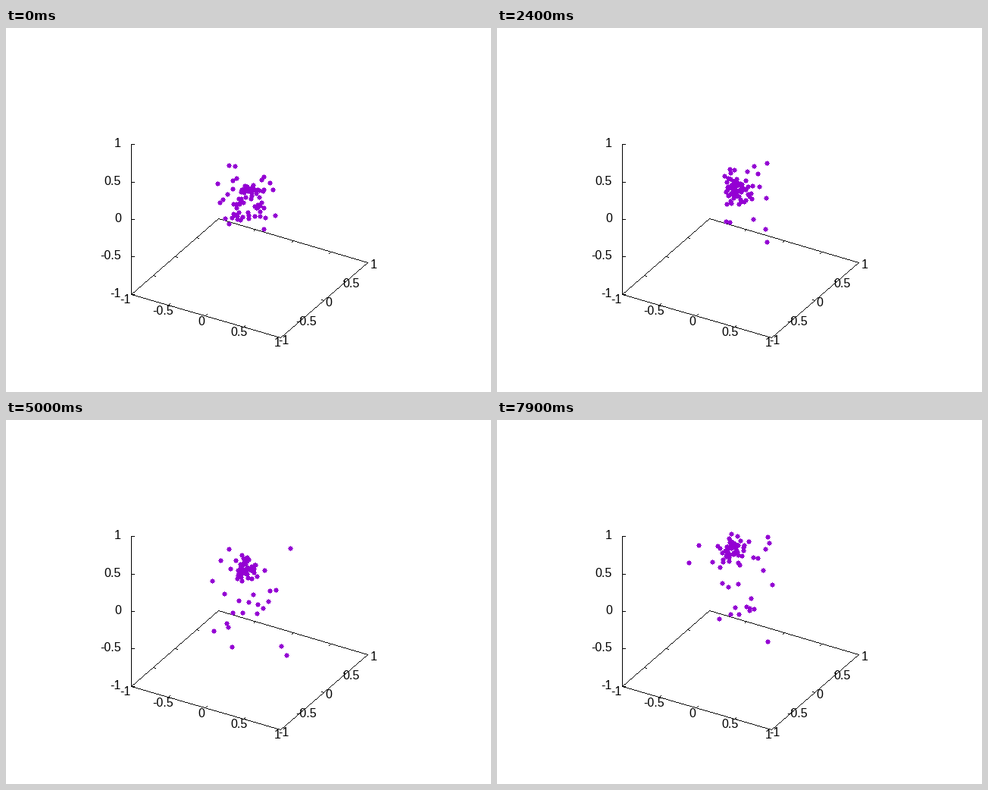
These frames come from a looping animation (640x480 px, 8000 ms). A matplotlib script:

```python
import numpy as np
import matplotlib.pyplot as plt
from matplotlib.animation import FuncAnimation
from matplotlib.path import Path

W, H, DPI = 640, 480, 100
FRAMES, STEP = 80, 100
PX = 72 / DPI
PURPLE = "#9400d3"

plt.rcParams["font.family"] = "Liberation Sans"
fig = plt.figure(figsize=(W / DPI, H / DPI), dpi=DPI, facecolor="white")
ax = fig.add_axes([0, 0, 1, 1])
ax.set_xlim(0, W)
ax.set_ylim(H, 0)
ax.axis("off")


def line(p, q):
    """Pixels of a crisp one-pixel line."""
    p, q = np.asarray(p), np.asarray(q)
    n = int(np.abs(q - p).max()) + 1
    return np.rint(np.linspace(p, q, n))


def label(text, x, y, ha="center"):
    ax.text(x, y + 5.4, text, ha=ha, va="baseline", fontsize=16 * PX, zorder=2)


def stamp(marker, size, color, zorder):
    art = ax.scatter([], [], s=(size * PX) ** 2, marker=marker, color=color,
                     linewidths=0, zorder=zorder)
    art.set_snap(False)
    return art


def place(art, pixels):
    art.set_offsets(np.rint(pixels) + 0.5)


# Box base and vertical axis
left, front = np.array([164, 350]), np.array([361, 407])
right, back = np.array([476, 308]), np.array([279, 250])
top = np.array([164, 152])
edges = [line(left, front), line(front, right), line(right, back),
         line(back, left), line(left, top)]

for k, name in enumerate(["-1", "-0.5", "0", "0.5", "1"]):
    f = k / 4
    z = np.rint(left + f * (top - left))
    edges.append(line(z, z + (4, 0)))
    label(name, 152, z[1], "right")
    label(name, 157 + 50.2 * k, 358 + 14.1 * k)
    label(name, 366.5 + 29.6 * k, 412 - 25 * k)
    if 0 < k < 4:
        for a, b, tick in [(left, front, (2, -2)), (back, right, (-2, 2)),
                           (left, back, (3, 1)), (front, right, (-3, -1))]:
            p = np.rint(a + f * (b - a))
            edges.append(line(p, p + tick))

place(stamp("s", 1, "black", 1), np.vstack(edges))

# Bodies run on ellipses: a tight core that rises, and a wide halo left behind
CORE, HALO, CEILING = 51, 27, 123
rng = np.random.default_rng(11)
core_r = np.abs(rng.normal(0, 23, (CORE, 2))) + 4
reach = rng.uniform(25, 115, HALO)
halo_r = reach[:, None] * rng.uniform((0.4, 0.6), (0.75, 1.05), (HALO, 2))
core_phase = rng.uniform(0, 2 * np.pi, (CORE, 2))
halo_phase = rng.uniform(0, 2 * np.pi, (HALO, 2))


def spin(radius):
    """Angular speed falls with distance, as in Kepler's third law."""
    size = np.hypot(*radius.T) / 1.4
    speed = np.minimum(4, 0.35 * (110 / size) ** 1.5)
    return (speed * rng.choice([-1, 1], len(size)))[:, None]


core_spin, halo_spin = spin(core_r), spin(halo_r)


def bodies(t):
    start = np.array([319, 226])
    drift = np.array([-1.4 * t, -4.5 * t - 0.35 * t * t])
    shrink = 0.42 + 0.58 * np.exp(-(t / 0.9) ** 2)
    grow = 1 - 0.5 * np.exp(-(t / 2.5) ** 2)
    core = start + drift + shrink * core_r * np.cos(core_spin * t + core_phase)
    halo = start + 0.2 * drift + grow * halo_r * np.cos(halo_spin * t + halo_phase)
    pts = np.vstack([core, halo])
    return pts[pts[:, 1] > CEILING]


# Dot: a 5 px square with a one-pixel nub on each side
side = np.array([(3.5, -0.5), (3.5, 0.5), (2.5, 0.5), (2.5, 2.5), (0.5, 2.5)])
turn = np.array([(0, 1), (-1, 0)])
outline = np.vstack([side @ np.linalg.matrix_power(turn, k) for k in range(4)])
dots = stamp(Path(np.vstack([outline, outline[:1]]), closed=True), 7, PURPLE, 3)


def update(n):
    place(dots, bodies(n * STEP / 1000))
    return (dots,)


anim = FuncAnimation(fig, update, frames=FRAMES, interval=STEP,
                     init_func=lambda: update(0), repeat=True, repeat_delay=0)
plt.show()
```
